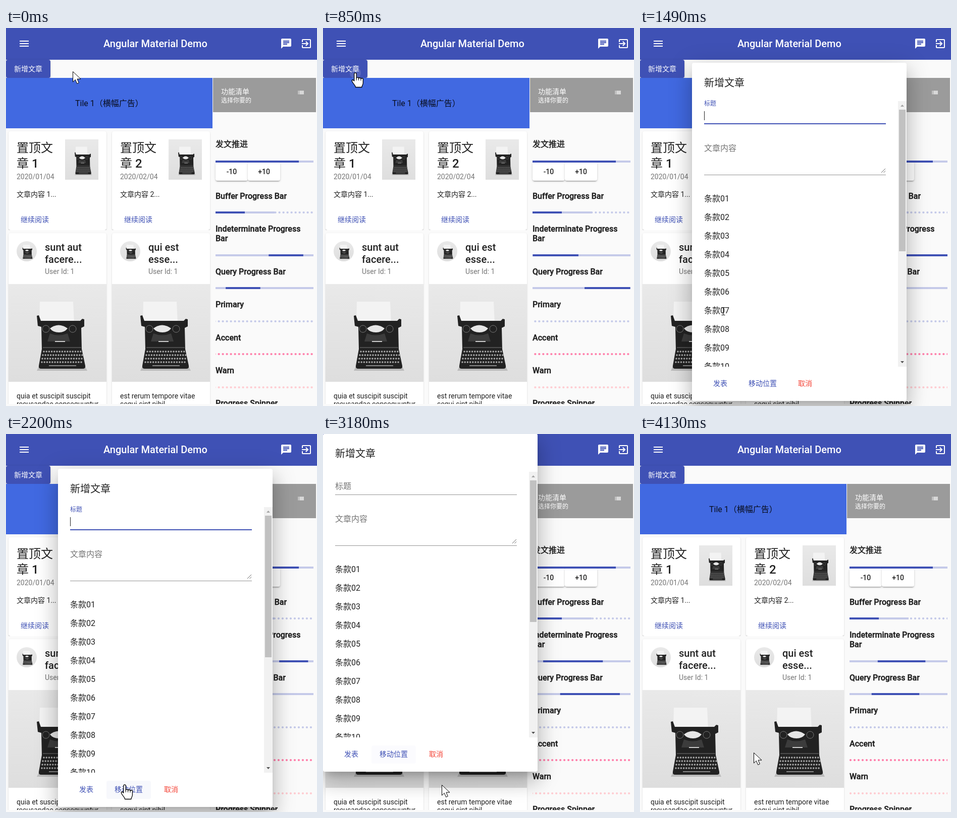
Animation of 616x750 px, one loop 4.15 s. Source, as an HTML page:

```html
<!DOCTYPE html>
<html lang="zh">
<head>
<meta charset="utf-8">
<title>Angular Material Demo</title>
<style>
html, body { margin: 0; width: 100%; height: 100%; overflow: hidden; }
body { background: #fafafa; font-family: Roboto, 'Noto Sans CJK SC', 'Noto Sans CJK', sans-serif; }
#page, #dialog { position: absolute; left: 0; top: 0; }
#page { width: 616px; height: 750px; overflow: hidden; }
#page div, #page span, #page i, #page b, svg { position: absolute; }
/* zero line height: top is the middle of the line */
span { line-height: 0; white-space: pre; }
.m { font-weight: 500; }
.h { font-weight: 500; -webkit-text-stroke: .4px; }
.c { transform: translateX(-50%); }
.card { border-radius: 4px; box-shadow: 0 2px 1px -1px #0003, 0 1px 1px #00000024, 0 1px 3px #0000001f; }
.clip { clip-path: inset(-4px -4px 0); }
.raised { border-radius: 4px; overflow: hidden; box-shadow: 0 3px 1px -2px #0003, 0 2px 2px #00000024, 0 1px 5px #0000001f; }
.bar { overflow: hidden; }
.bar i, .bar b { width: 100%; height: 100%; }
.bar b { background: #3f51b5; }
.query { transform: scaleX(-1); }
.one { left: -145.1666%; animation: move1 2s linear infinite paused; }
.one b { animation: size1 2s linear infinite paused; }
.two { left: -54.8889%; animation: move2 2s linear infinite paused; }
.two b { animation: size2 2s linear infinite paused; }
.dots {
  left: 415px; width: 194px; height: 4px;
  background: radial-gradient(circle at 2px 2px, var(--dot) 1.7px, transparent 2.3px) 0 0 / 8px 4px;
  animation: dots .25s linear infinite paused;
}
@keyframes dots { to { background-position: -8px 0; } }
@keyframes move1 {
  0% { transform: translateX(0); }
  20% { transform: translateX(0); animation-timing-function: cubic-bezier(.5, 0, .7017, .4958); }
  59.15% { transform: translateX(83.6714%); animation-timing-function: cubic-bezier(.3024, .3814, .55, .9564); }
  100% { transform: translateX(200.611%); }
}
@keyframes size1 {
  0% { transform: scaleX(.08); }
  36.65% { transform: scaleX(.08); animation-timing-function: cubic-bezier(.3347, .1248, .7858, 1); }
  69.15% { transform: scaleX(.6615); animation-timing-function: cubic-bezier(.06, .11, .6, 1); }
  100% { transform: scaleX(.08); }
}
@keyframes move2 {
  0% { transform: translateX(0); animation-timing-function: cubic-bezier(.15, 0, .5151, .4097); }
  25% { transform: translateX(37.6519%); animation-timing-function: cubic-bezier(.3103, .2841, .8, .7337); }
  48.35% { transform: translateX(84.3862%); animation-timing-function: cubic-bezier(.4, .627, .6, .902); }
  100% { transform: translateX(160.2778%); }
}
@keyframes size2 {
  0% { transform: scaleX(.08); animation-timing-function: cubic-bezier(.205, .0571, .5766, .454); }
  19.15% { transform: scaleX(.4571); animation-timing-function: cubic-bezier(.1523, .1964, .6484, 1.0043); }
  44.15% { transform: scaleX(.728); animation-timing-function: cubic-bezier(.2578, -.0032, .2118, 1.3818); }
  100% { transform: scaleX(.08); }
}
#dialog {
  height: 671px; background: #fff; border-radius: 4px;
  box-shadow: 0 11px 15px -7px #0003, 0 24px 38px 3px #00000024, 0 9px 46px 8px #0000001f;
}
#content { left: 0; right: 0; top: 76px; height: 527px; overflow: hidden; }
.line { left: 24px; right: 41px; height: 1px; background: #0000006b; }
#focus { height: 2px; background: #3f51b5; }
#label { transform-origin: 0 0; }
</style>
</head>
<body>
<svg width="0" height="0">
  <linearGradient id="wall" x2="0" y2="1">
    <stop stop-color="#e9e9e9"/><stop offset="1" stop-color="#dedede"/>
  </linearGradient>
  <symbol id="photo" viewBox="0 0 194 194" preserveAspectRatio="none">
    <path fill="url(#wall)" d="M0 0h194v194H0z"/>
    <path fill="#bbb" d="M60 164h92l4 8H56z"/>
    <path fill="#f3f3f3" d="M62 35h66l2 43H61z"/>
    <path fill="#222" d="M56 63l4-1 4 11h78l4-4 4 1v14l-6 3 1 42 7 33q1 6-5 6H65q-6 0-5-6l6-33-1-44-7-2z"/>
    <path fill="#e6e6e6" d="M82 88q17-13 35 0-6 8-17 8-12 0-18-8z"/>
    <path fill="#3c3c3c" d="M82 98q17 7 35 0l5 16H77z"/>
    <g fill="none" stroke="#777">
      <circle cx="74" cy="89" r="7"/><circle cx="127" cy="89" r="7"/>
      <path d="M68 126h76"/>
      <path stroke="#ccc" stroke-width="2" d="M92 114h20"/>
      <g stroke="#aaa" stroke-width="3.5" stroke-linecap="round" stroke-dasharray="0 5.2">
        <path d="M70 134h74M68 141h78M67 148h80M66 155h82"/>
      </g>
      <path stroke="#888" stroke-width="2" d="M80 162h54"/>
    </g>
  </symbol>
</svg>
<div id="page"></div>
<script>
const LOOP = 4150, BLUE = '#3f51b5', INK = '#000000de', GREY = '#0000008a';
const page = document.getElementById('page');

function add(parent, tag, style, cls = '', html = '') {
  const e = document.createElement(tag);
  e.style.cssText = style;
  e.className = cls;
  e.innerHTML = html;
  return parent.appendChild(e);
}
const box = (parent, x, y, w, h, color, cls) =>
  add(parent, 'div', `left:${x}px;top:${y}px;width:${w}px;height:${h}px;background:${color}`, cls);
const text = (parent, x, y, size, str, color = INK, cls = '') =>
  add(parent, 'span', `left:${x}px;top:${y}px;font-size:${size}px;color:${color}`, cls, str);
const svg = (parent, x, y, w, h, html, style = '') =>
  add(parent, 'div', `left:${x}px;top:${y}px;width:${w}px;height:${h}px;overflow:hidden;${style}`, '',
    `<svg width="${w}" height="${h}">${html}</svg>`);
const photo = (x, y, w, h, style) =>
  svg(page, x, y, w, h, `<use href="#photo" width="${w}" height="${h}"/>`, style);
const icon = (x, y, d) => svg(page, x, y, 24, 24, `<path fill="#fff" d="${d}"/>`);

// Toolbar
box(page, 0, 0, 616, 63, BLUE);
icon(24, 19, 'M3 18h18v-2H3zm0-5h18v-2H3zm0-7v2h18V6z');
text(page, 193, 31, 20, 'Angular Material Demo', '#fff', 'm');
icon(543, 19, 'M20 2H4c-1.1 0-2 .9-2 2v18l4-4h14c1.1 0 2-.9 2-2V4c0-1.1-.9-2-2-2zM6 9h12v2H6zm8 5H6v-2h8zm4-6H6V6h12z');
icon(583, 19, 'M10.1 15.6L11.5 17l5-5-5-5-1.4 1.4L12.7 11H3v2h9.7zM19 3H5a2 2 0 0 0-2 2v4h2V5h14v14H5v-4H3v4c0 1.1.9 2 2 2h14c1.1 0 2-.9 2-2V5c0-1.1-.9-2-2-2z');

// New-post button and the banner covering its shadow
const newPost = box(page, 0, 63, 88, 36, BLUE, 'raised');
const ripple = box(newPost, -16, -54, 160, 160, '#fff');
ripple.style.borderRadius = '50%';
text(newPost, 16, 17.5, 14, '新增文章', '#fff', 'm');
box(page, 0, 99, 409, 100, '#4169e1');
text(page, 137, 150, 16, 'Tile 1（横幅广告）');

// Cards
function pinned(x, n) {
  box(page, x, 205, 194, 196, '#fff', 'card clip');
  text(page, x + 16, 238, 24, '置顶文');
  text(page, x + 16, 269, 24, `章 <em style="font:inherit;font-weight:500">${n}</em>`);
  text(page, x + 16, 295, 14, `2020/0${n}/04`, GREY);
  text(page, x + 16, 330, 14, `文章内容 ${n}...`);
  text(page, x + 24, 380, 14, '继续阅读', BLUE);
  photo(x + 112, 221, 66, 80);
}
function post(x, title, body) {
  box(page, x, 407, 194, 400, '#fff', 'card');
  photo(x + 16, 423, 40, 40, 'border-radius:50%');
  title.forEach((s, i) => text(page, x + 72, 435 + 24 * i, 20, s, INK, 'm'));
  text(page, x + 72, 483, 14, 'User Id: 1', GREY);
  photo(x, 508, 194, 194);
  body.forEach((s, i) => text(page, x + 16, 730 + 16 * i, 14, s));
}
pinned(5, 1);
pinned(210, 2);
post(5, ['sunt aut', 'facere...'], ['quia et suscipit suscipit', 'recusandae consequuntur']);
post(210, ['qui est', 'esse...'], ['est rerum tempore vitae', 'sequi sint nihil']);

// Side panel
box(page, 410, 99, 204, 68, '#9b9b9b');
text(page, 426, 126, 14, '功能清单', '#fff', 'm');
text(page, 426, 143.5, 12, '选择你要的', '#fff', 'm');
svg(page, 578, 124, 12, 8, '<path stroke="#fff" stroke-width="1.5" d="M.5 1.5h1.5m1 0h9M.5 4h1.5m1 0h9M.5 6.5h1.5m1 0h9"/>');

const heads = [[231, '发文推进'], [334, 'Buffer Progress Bar'], [398.5, 'Indeterminate Progress'], [418, 'Bar'],
  [484, 'Query Progress Bar'], [549, 'Primary'], [615, 'Accent'], [680, 'Warn'], [745, 'Progress Spinner']];
for (const [y, s] of heads) text(page, 415, y, 16, s, INK, 'h');

const track = (y, color, cls = '') => box(page, 415, y, 194, 4, color, 'bar ' + cls);
const dots = (y, color) => add(page, 'div', `top:${y}px;--dot:${color}`, 'dots');
['-10', '+10'].forEach((s, i) => {
  const b = box(page, 415 + 64 * i, 266, 64, 37, '#fff', 'raised');
  text(b, 32, 18.5, 14, s, INK, 'c m');
});
box(track(263, '#c5cae9'), 0, 0, 165, 4, BLUE);
dots(364, '#c5cae9');
box(page, 415, 364, 117, 4, '#c5cae9');
box(page, 415, 364, 58, 4, BLUE);
for (const [y, cls] of [[449, ''], [514, 'query']])
  track(y, '#c5cae9', cls).innerHTML = '<i class="one"><b></b></i><i class="two"><b></b></i>';
dots(580, '#c5cae9');
dots(645, '#ff80ab');
dots(711, '#ffcdd2');
// Lower edge of the viewport
box(page, 0, 746, 616, 4, '#fafafa');

// Dialog
const dialog = add(page, 'div', '');
dialog.id = 'dialog';
text(dialog, 24, 40, 20, '新增文章');
const label = text(dialog, 24, 0, 16, '标题');
label.id = 'label';
add(dialog, 'div', 'top:121px', 'line');
const focusLine = add(dialog, 'div', 'top:120px', 'line');
focusLine.id = 'focus';
const caret = box(dialog, 24, 96, 1, 18, '#222');
text(dialog, 24, 170, 16, '文章内容', GREY);
add(dialog, 'div', 'top:222px', 'line');
add(dialog, 'div', 'right:41px;top:209px;width:10px;height:10px', '',
  '<svg width="10" height="10"><path stroke="#666" d="M1 9l8-8M5.5 9l3.5-3.5"/></svg>');
const content = add(dialog, 'div', '');
content.id = 'content';
for (let i = 1; i <= 10; i++)
  text(content, 24, 157 + 37 * i, 16, '条款' + String(i).padStart(2, '0'));
add(content, 'div', 'right:0;top:0;width:17px;height:527px;background:#f1f1f1', '',
  `<div style="left:2px;top:17px;width:13px;height:281px;background:#c1c1c1"></div>
   <svg width="17" height="527"><path fill="#a3a3a3" d="M5 11l3.5-4 3.5 4z"/><path fill="#505050" d="M5 516l3.5 4 3.5-4z"/></svg>`);
const tint = box(dialog, 96, 619, 88, 36, BLUE);
tint.style.borderRadius = '4px';
text(dialog, 42, 636, 14, '发表', BLUE);
text(dialog, 112, 636, 14, '移动位置', BLUE);
text(dialog, 210, 636, 14, '取消', '#f44336');

// Pointer shapes, hotspot at 0,0
const shapes = {
  arrow: '<path fill="#fff" stroke="#000" d="M.5.5V21l4.8-4.6 3.4 8 3.6-1.6-3.3-7.7h7z"/>',
  hand: `<path fill="#fff" stroke="#000" stroke-width="1.3" stroke-linejoin="round" d="M-2.2 2a2.2 2.2 0 0 1 4.4 0v9a2.2 2.2 0 0 1 4.4.6 2.2 2.2 0 0 1 4.4.8 2.2 2.2 0 0 1 4.4 1.4V20c0 4-2.5 5-2.5 8.5H.5C.5 25-5 21-6.5 16.5c-1-3 2-3.5 4.3-.5z"/>
    <path stroke="#000" d="M2.2 11v4M6.6 11.5V15M11 12.5V15.5"/>`,
  beam: '<path fill="none" stroke="#000" d="M-3.5-7.5h3l.5.5.5-.5h3M-3.5 7.5h3l.5-.5.5.5h3M0-7V7"/>'
};
const pointer = add(page, 'div', 'left:0;top:0');
let shape = '';
function setShape(s) {
  if (s === shape) return;
  shape = s;
  pointer.innerHTML = `<svg style="overflow:visible;left:0;top:0" width="1" height="1">${shapes[s]}</svg>`;
}

// Straight interpolation through [time, value, ...] keys
function along(t, keys) {
  let i = 1;
  while (i < keys.length - 1 && t > keys[i][0]) i++;
  const a = keys[i - 1], b = keys[i];
  const u = Math.min(1, Math.max(0, (t - a[0]) / (b[0] - a[0])));
  return a.slice(1).map((v, k) => v + (b[k + 1] - v) * u);
}
const ease = (t, start, length, power = 3) =>
  1 - (1 - Math.min(1, Math.max(0, (t - start) / length))) ** power;

const OPEN = 915, FOCUS = 1080, BLUR = 2310, MOVE = 2400, CLOSE = 3880;
const barClock = [[0, .803], [470, 1.032], [980, 1.254], [2690, 2.06], [3640, 2.515], [4130, 2.75], [4150, 2.76]];
const route = [[40, 132, 86], [140, 122, 88], [330, 82, 86], [470, 71, 84], [550, 64, 89], [1110, 64, 89],
  [1220, 82, 200], [1380, 135, 455], [1490, 165, 561], [1600, 210, 660], [1700, 235, 696], [3250, 235, 696],
  [3350, 236, 672], [3480, 235, 634], [3640, 235, 634], [3760, 223, 632], [3950, 223, 632], [4130, 225, 632]];
const tintKeys = [[1690, 0], [1760, .04], [BLUR, .04], [2450, .12], [2750, .12], [3150, .02]];

function pickShape(t, x, y) {
  if (t < OPEN + 300 && x < 88) return 'hand';
  if (t < MOVE) return y > 685 ? 'hand' : y > 300 && y < 675 ? 'beam' : 'arrow';
  return t < CLOSE + 60 && y < 655 ? 'hand' : 'arrow';
}

function draw(now) {
  const t = now % LOOP;
  const clock = along(t, barClock)[0] * 2000;
  for (const a of animations) a.currentTime = clock;

  ripple.style.transform = `scale(${ease(t, 840, 225)})`;
  ripple.style.opacity = t < 840 ? 0 : .12 * (1 - ease(t, 1060, 400, 1));

  const opened = ease(t, OPEN, 150, 2.7);
  const width = t < FOCUS ? 408 : 425, moved = t >= MOVE;
  dialog.style.visibility = t > OPEN && t < CLOSE + 75 ? 'visible' : 'hidden';
  dialog.style.opacity = opened * (1 - ease(t, CLOSE, 75, 1));
  dialog.style.width = width + 'px';
  dialog.style.left = (moved ? 0 : 315.5 - width / 2) + 'px';
  dialog.style.top = (moved ? -1 : 69) + 'px';
  dialog.style.transform = opened < 1 ? `scale(${.7 + .3 * opened})` : 'none';

  const focused = t >= FOCUS && t < BLUR;
  const raise = ease(t, FOCUS, 400) - ease(t, BLUR, 400);
  label.style.top = 105 - 24 * raise + 'px';
  label.style.transform = `scale(${1 - .25 * raise})`;
  label.style.color = focused ? BLUE : GREY;
  focusLine.style.transform = `scaleX(${focused ? ease(t, FOCUS, 300) : 1})`;
  focusLine.style.opacity = focused ? 1 : 0;
  caret.style.opacity = focused && (t - FOCUS) % 1000 < 500 ? 1 : 0;
  tint.style.opacity = along(t, tintKeys)[0];

  const [x, y] = along(t, route);
  setShape(pickShape(t, x, y));
  pointer.style.transform = `translate(${Math.round(x)}px, ${Math.round(y)}px)`;
}

const animations = document.getAnimations();
function tick() {
  draw(performance.now());
  requestAnimationFrame(tick);
}
tick();
</script>
</body>
</html>
```
